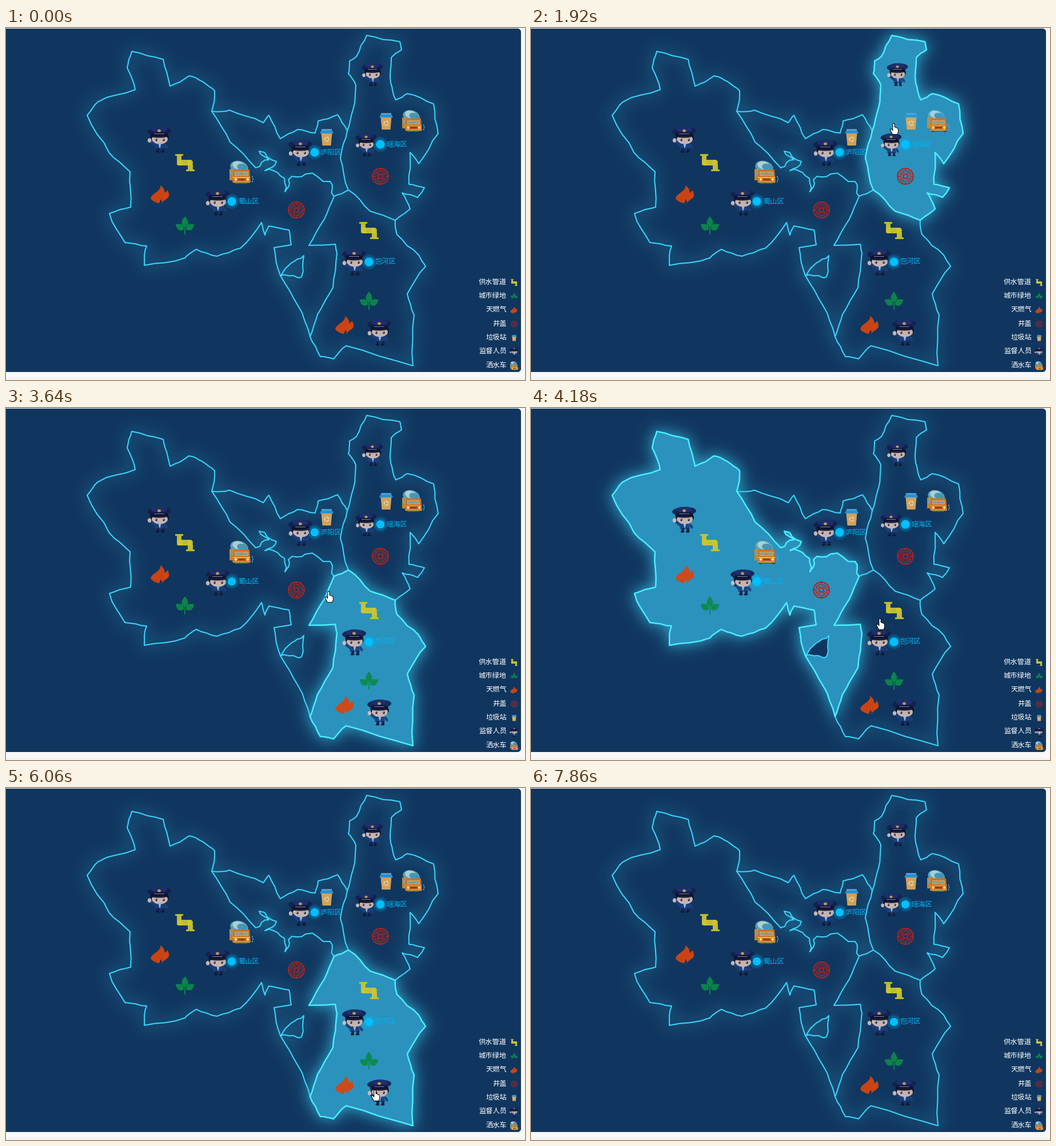
A matplotlib script for the animation above (7930 ms loop, 908 px wide and 617 px high).

```python
import numpy as np
import matplotlib.pyplot as plt
from matplotlib.animation import FuncAnimation
from matplotlib.collections import LineCollection, PolyCollection
from matplotlib.path import Path

W, H, DPI = 908, 617, 100
LOOP, STEP = 7930, 65
FONT = "Noto Sans CJK JP"
PANEL = np.array([16, 54, 95.0])
GLOW = np.array([62, 214, 250.0])
FILL = np.array([43, 146, 189.0])
LINE, HOT = "#3ad3fa", "#4aecff"
rng = np.random.default_rng(4)


# ---- borders: corner points joined by rough lines, shared between districts
def rough(*corners, amp=0.06, limit=2.2):
    p = np.array(corners, float)
    for _ in range(2):
        d = np.diff(p, axis=0)
        size = np.hypot(*d.T)
        push = rng.uniform(-1, 1, len(d)) * np.minimum(amp, limit / size)
        mid = p[:-1] + d / 2 + np.column_stack([-d[:, 1], d[:, 0]]) * push[:, None]
        out = np.empty((2 * len(p) - 1, 2))
        out[::2], out[1::2] = p, mid
        p = out
    return p


west = rough((360, 146), (365, 110), (344, 94), (320, 84), (287, 102), (275, 55),
             (220, 41), (212, 70), (226, 108), (160, 130), (142, 153), (180, 218),
             (217, 252), (218, 314), (181, 325), (208, 376), (246, 382), (242, 416),
             (313, 403), (333, 388), (369, 400), (410, 386), (447, 341), (453, 363),
             (460, 347), (495, 354), (499, 380), (469, 385), (480, 434), (511, 487),
             (532, 541))
lake = rough((481, 434), (499, 412), (521, 399), (517, 436), (500, 434), (481, 434), amp=0.3)
mid_south = rough((532, 541), (545, 502), (572, 455), (579, 395), (576, 379), (530, 381),
                  (557, 335), (574, 295), amp=0.03)
river = rough((574, 295), (567, 269), (524, 256), (494, 266), (488, 287), (480, 259),
              (453, 250), (473, 234), (443, 216), (460, 231), (437, 245), amp=0.25, limit=5)
ridge = rough((437, 245), (392, 200), (360, 146))
north = rough((360, 146), (391, 144), (450, 166), (460, 153), (480, 194), (510, 178),
              (541, 184), (546, 163), (580, 152), (597, 180))
mid_north = rough((597, 180), (585, 228), (599, 284))
gap = rough((599, 284), (574, 295))
east_n = rough((597, 180), (608, 140), (612, 100), (599, 80), (601, 58), (613, 50),
               (631, 13), (689, 24), (692, 38), (674, 52), (673, 96), (682, 126),
               (702, 115), (748, 133), (756, 185), (722, 238), (707, 218), (705, 274),
               (732, 280), (720, 297), (693, 289), (707, 317), (681, 337))
mid_east = rough((681, 337), (637, 321), (599, 284))
east_s = rough((681, 337), (684, 362), (722, 398), (734, 418), (702, 466), (714, 503),
               (712, 592), (595, 557), (573, 580), (550, 576), (532, 541))

borders = [west, lake, mid_south, river, ridge, north, mid_north, gap,
           east_n, mid_east, east_s]
districts = [np.vstack(arcs) for arcs in (
    (west, mid_south, river, ridge),
    (north, mid_north, gap, river, ridge),
    (east_n, mid_east, mid_north[::-1]),
    (mid_south, gap[::-1], mid_east[::-1], east_s))]
shapes = [Path(d) for d in districts]

# ---- backdrop with glows
yy, xx = np.mgrid[0:H, 0:W] + 0.5
grid = np.column_stack([xx.ravel(), yy.ravel()])


def inside(path):
    return path.contains_points(grid).reshape(H, W).astype(float)


def blur(m, s):
    fy, fx = np.fft.fftfreq(H)[:, None], np.fft.rfftfreq(W)
    g = np.exp(-2 * (np.pi * s) ** 2 * (fx ** 2 + fy ** 2))
    return np.fft.irfft2(np.fft.rfft2(m) * g, s=m.shape)


def stroke(lines):
    m = np.zeros((H, W))
    for line in lines:
        for a, b in zip(line, line[1:]):
            size = np.hypot(*(b - a))
            n = int(2 * size) + 1
            p = (a + (b - a) * np.linspace(0, 1, n)[:, None]).astype(int)
            np.add.at(m, (p[:, 1], p[:, 0]), 2 * size / n)
    return m


def mix(a, b, k):
    return a + (b - a) * k[..., None]


def on_page(img):
    dx = np.maximum(xx - 895, 0)
    dy = np.maximum(np.maximum(yy - 597, 7 - yy), 0)
    card = np.clip(6.5 - np.hypot(dx, dy), 0, 1)
    shade = 248 - 6 * np.clip((yy - 611) / 4, 0, 1)
    rgb = mix(np.repeat(shade[..., None], 3, 2), img, card)
    return np.dstack([rgb, np.full((H, W), 255)]).round().astype(np.uint8)


base = mix(PANEL, GLOW, 1.3 * blur(stroke(borders), 13))
water = inside(Path(lake))
backs = [on_page(base)]
for i, shape in enumerate(shapes):
    body = inside(shape)
    lit = mix(base, GLOW, np.clip(0.7 * blur(body, 13), 0, 1))
    if i == 0:
        body *= 1 - water
        lit = mix(lit, PANEL, water)
    backs.append(on_page(mix(lit, FILL, body)))


# ---- icon parts: lists of (vertices, colour) around a centre
def turn(p, deg):
    c, s = np.cos(np.radians(deg)), np.sin(np.radians(deg))
    return p @ np.array([[c, s], [-s, c]])


def arc(r, a0=0, a1=360):
    t = np.radians(np.linspace(a0, a1, 30))
    return r * np.column_stack([np.cos(t), np.sin(t)])


def disc(x, y, rx, ry=None, tilt=0):
    return turn(arc(1) * [rx, ry or rx], tilt) + [x, y]


def ring(r0, r1, a0=0, a1=360):
    return np.vstack([arc(r1, a0, a1), arc(r0, a0, a1)[::-1]])


def box(x0, y0, x1, y1):
    return np.array([(x0, y0), (x1, y0), (x1, y1), (x0, y1)])


def taper(y0, w0, y1, w1):
    return np.array([(-w0, y0), (w0, y0), (w1, y1), (-w1, y1)])


def petal(size, width):
    t = np.linspace(0, 1, 16)
    side = width * np.sin(np.pi * t ** 0.8)
    return np.vstack([np.column_stack([side, -size * t]),
                      np.column_stack([-side, -size * t])[::-1]])


def pipe():
    bars = [(-17, -15, -3, -12), (-14, -12, -6, 4), (-12, -5, 11, 5), (5, 3, 14, 12),
            (2, 12, 17, 15)]
    bends = [disc(-9, 0, 5), disc(9, 0, 5)]
    return [(v, "#cdc630") for v in [box(*b) for b in bars] + bends]


def leaf():
    leaves = [turn(petal(19, 5.5), 0) + [0, 3]]
    leaves += [turn(petal(17, 5.5), a) + [np.sign(a) * 2, 7] for a in (-58, 58)]
    return [(v, "#0b8a4a") for v in leaves + [box(-1, 2, 1, 16)]]


def flame():
    t = np.linspace(0, 1, 30)
    width = 14 * np.sin(np.pi * t ** 1.7) ** 0.8
    lean = 3 * np.sin(2 * np.pi * t)
    y = -17 + 33 * t
    left = np.column_stack([lean - width - 1, y])
    right = np.column_stack([lean + width * (0.8 + 0.2 * np.cos(9 * t)) - 1, y])
    notch = np.array([(3, 15), (0, 8), (-3, 15)])
    lick = turn(petal(16, 4.5), 14) + [8, 8]
    return [(np.vstack([left[:-1], notch[::-1], right[-2::-1]]), "#d9450f"),
            (lick, "#d9450f")]


def cover():
    parts = [ring(12.6, 15), ring(2.6, 4.8)]
    for a in range(0, 360, 90):
        parts += [ring(8.8, 10.8, a + 12, a + 78), ring(5.8, 7.3, a + 12, a + 78),
                  turn(box(8, -1, 14, 1), a)]
    return [(v, "#ae2420") for v in parts]


def bin_():
    marks = [(ring(2.8, 4.4, a, a + 95) + [0, 3], "#f3dfb8") for a in (20, 140, 260)]
    return [(taper(-8, 9.5, 14, 7.5), "#e0ab5c"), (taper(-12, 10, -7, 12), "#2f97d6"),
            (box(-9, -15, 9, -12), "#48acdf")] + marks


def guard():
    navy, skin, suit, dark = "#14204f", "#d6c1bb", "#1c3f7d", "#12152b"
    parts = [(disc(1, -3, 16, 11), dark), (disc(1, 0, 14, 8.5), skin),
             (disc(0, -6, 16, 3.5), dark),
             (disc(0, -14, 21, 7.5, -3), navy), (disc(0, -17, 14, 5), "#1f3070"),
             (disc(0, -8.5, 16, 3), "#0c1433"), (box(-9, -10.4, 9, -9.4), "#8e8fa8"),
             (disc(0, -15, 3, 2.4), "#c9a548")]
    for x in (-5, 8):
        parts += [(disc(x, 1, 1.7, 2.3), dark), (disc(x - 0.5, 0.2, 0.7), "white")]
    parts += [(turn(box(-6, -2.5, 7, 2.5), 40) + [-11, 7], suit),
              (disc(-17, 2, 3.2, 3.8), skin), (taper(8, 7, 17, 9) + [1, 0], suit),
              (taper(8, 2.5, 15, 0.6) + [1, 0], "#9fc3e6"), (disc(12, 12, 2.5, 5, -35), suit)]
    for x in (-3, 6):
        parts += [(box(x - 2.5, 16, x + 2.5, 21), navy), (disc(x, 22, 3.5, 1.5), dark)]
    return parts


def truck():
    dark, glass = "#394048", "#7f9f9c"
    parts = [(disc(x, 15, 4.5, 6), dark) for x in (-8, 14)]
    parts += [(disc(-2, -9, 16, 11, 15), "#5fa9bd"), (disc(-3, -12, 11, 7, 15), "#b3d3d2"),
              (disc(3, -9, 9, 6, 15), "#3d93b5"),
              (box(-19, -6, -12, 14), "#c98d2f"), (box(-18, -3, -13, 4), glass),
              (taper(-5, 14, 17, 16) + [2, 0], "#d96f22"),
              (box(-10, -1, 14, 6), "#e2b54a"), (box(-9, 0, 13, 5), glass),
              (box(1, 0, 2.5, 5), "#d96f22"), (box(-13, 8, 17, 9.5), "#efc03c"),
              (box(-4, 11, 8, 14), "#8e3a20"), (box(-13, 16, 17, 18), "#d9a93a"),
              (box(-9, 18, 12, 20), "#3c6b62")]
    parts += [(disc(x, 12.5, 2.4), "#f5e3a2") for x in (-8, 13)]
    return parts + [(disc(21 + k % 2, 8 + 4 * k, 1, 1.7), "#4da9cf") for k in range(3)]


kinds = [
    (pipe, "供水管道", [(313, 236), (635, 355)]),
    (leaf, "城市绿地", [(313, 346), (635, 478)]),
    (flame, "天燃气", [(271, 292), (594, 521)]),
    (cover, "井盖", [(508, 319), (655, 260)]),
    (bin_, "垃圾站", [(561, 192), (665, 164)]),
    (guard, "监督人员", [(268, 195), (370, 305), (515, 218), (630, 204, 0.88),
                     (641, 81, 0.88), (609, 410), (653, 533)]),
    (truck, "洒水车", [(410, 253), (711, 163, 0.94)]),
]

# ---- stage
fig = plt.figure(figsize=(W / DPI, H / DPI), dpi=DPI)
back = fig.figimage(backs[0], origin="upper", zorder=-1)
ax = fig.add_axes([0, 0, 1, 1])
ax.set(xlim=(0, W), ylim=(H, 0))
ax.axis("off")


def label(x, y, s, color, ha):
    ax.text(x, y, s, color=color, ha=ha, va="center", family=FONT,
            fontsize=12.2 * 72 / DPI, zorder=6)


def polys(verts=(), **style):
    return ax.add_collection(PolyCollection(verts, **style))


ax.add_collection(LineCollection(borders, colors=LINE, linewidths=1.5,
                                 capstyle="round", joinstyle="round", zorder=2))
edge, = ax.plot([], [], color=HOT, lw=1.7, solid_joinstyle="round", zorder=3)

parts = []
for row, (icon, name, spots) in enumerate(kinds):
    y = 445 + 24.35 * row
    label(876, y, name, "white", "right")
    for x0, y0, *k in spots + [(889, y + 1, 0.38)]:
        parts += [(v * (k[0] if k else 1) + [x0, y0], c) for v, c in icon()]
polys([v for v, _ in parts], facecolors=[c for _, c in parts], edgecolors="none",
      alpha=0.93, zorder=4)

dots = [(395, 304, "蜀山区"), (540, 218, "庐阳区"), (655, 204, "瑶海区"), (635, 410, "包河区")]
for x, y, name in dots:
    label(x + 11, y, name, "#00b6f2", "left")
waves = polys(linewidths=0.8, zorder=5)
polys([disc(x, y, 7.3) for x, y, _ in dots], facecolors="#00c0ff", edgecolors="none",
      zorder=5.5)

finger = box(-1.6, 0, 1.6, 12)
palm = np.array([(1.6, 6), (7.5, 8.5), (8.3, 14), (6.5, 19), (-2, 19), (-6.5, 10), (-4, 9.5)])
HAND = np.vstack([finger[:2], palm, finger[3:]])
ARROW = np.array([(0, 0), (0, 16), (4, 12.5), (6.5, 18), (9, 17), (6.5, 11.5), (11, 11)])
cursor = polys(facecolors="white", edgecolors="black", linewidths=0.7, zorder=9)

# pointer stops: time, x, y; each leg is a rest followed by an eased glide
route = np.array([
    (100, 790, 555), (600, 183, 141), (1850, 634, 167), (2540, 772, 207),
    (2880, 664, 264), (4000, 543, 333), (4160, 610, 369), (5150, 764, 452),
    (5980, 645, 529), (6800, 782, 570), (7560, 866, 640)])
SHOWN, GONE, LAG = 60, 7560, 120


def pointer(t):
    leg = np.clip(np.searchsorted(route[:, 0], t, "right") - 1, 0, len(route) - 2)
    a, b = route[leg], route[leg + 1]
    u = np.clip(((t - a[0]) / (b[0] - a[0]) - 0.2) / 0.65, 0, 1)
    return a[1:] + (b - a)[1:] * u * u * (3 - 2 * u)


def hit(t):
    if SHOWN < t < GONE:
        p = pointer(t)
        for i, shape in enumerate(shapes):
            if shape.contains_point(p):
                return i
    return -1


def draw(i):
    t = i * STEP
    hot = hit(t - LAG)
    back.set_data(backs[hot + 1])
    edge.set_data(*(districts[hot].T if hot >= 0 else ([], [])))
    phase = [(2 * t / LOOP + k / 3) % 1 for k in range(3)]
    waves.set_verts([disc(x, y, 7.5 + 7.5 * p) for x, y, _ in dots for p in phase])
    for paint, alpha in ((waves.set_edgecolor, 0.7), (waves.set_facecolor, 0.12)):
        paint([(0, 0.75, 1, alpha * (1 - p)) for _ in dots for p in phase])
    shape = HAND if hit(t) >= 0 else ARROW
    cursor.set_verts([shape + pointer(t)] if SHOWN < t < GONE else [])
    return back, edge, waves, cursor


anim = FuncAnimation(fig, draw, frames=LOOP // STEP, interval=STEP, repeat=True,
                     repeat_delay=0, blit=False)
plt.show()
```
